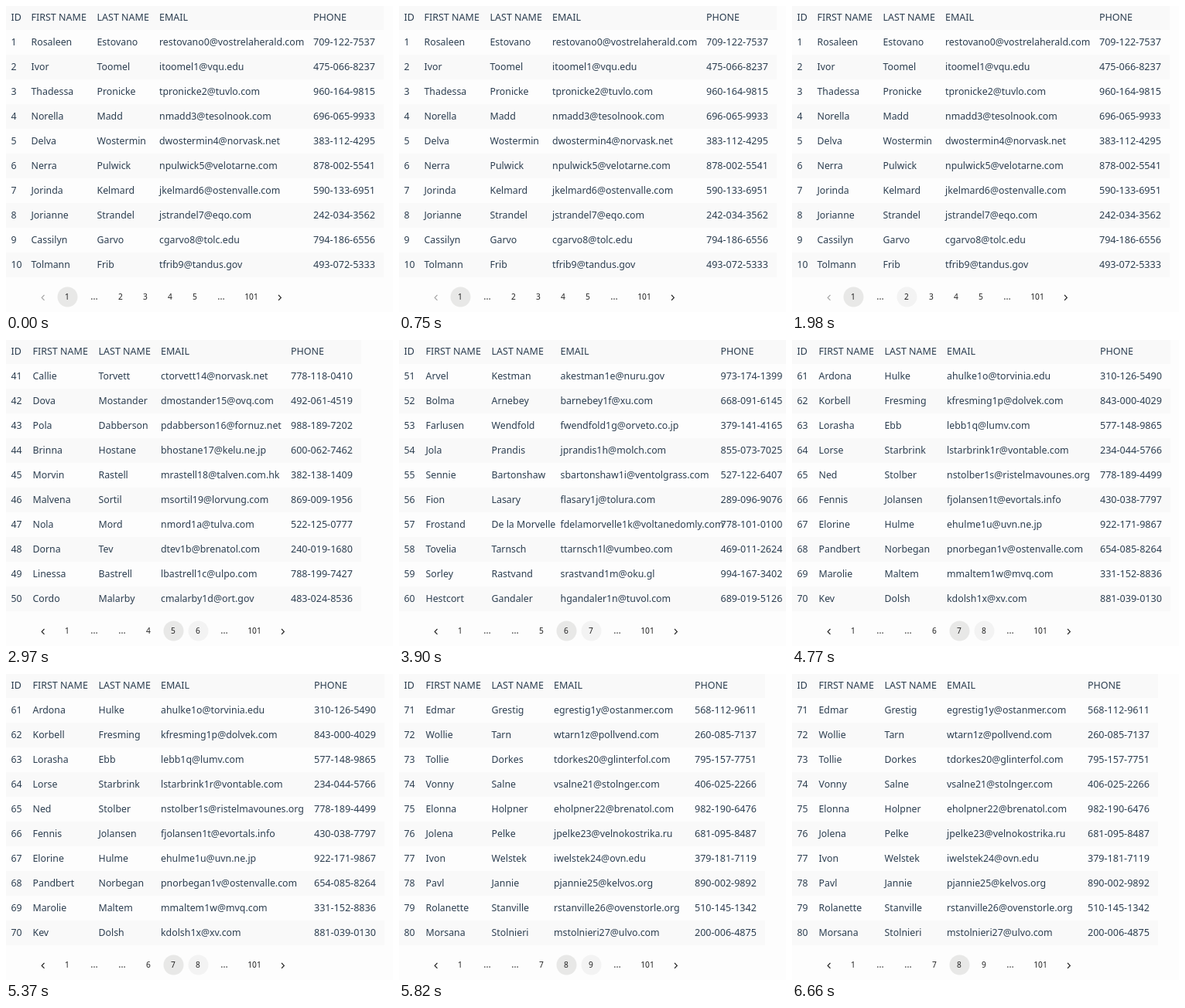
An HTML page for the animation above (6.69 s loop, 500 by 396 pixels).

```html
<!DOCTYPE html>
<html lang="en">
<head>
<meta charset="utf-8">
<title>Paged table</title>
<style>
html, body { margin: 0; width: 100%; height: 100%; overflow: hidden; background: #fdfdfd; }
svg { display: block; width: 500px; height: 396px; }
text { font-family: "Noto Sans", "Open Sans", sans-serif; font-size: 12.35px; fill: #2c3e50; white-space: pre; }
.head { font-size: 12.5px; }
.phone { font-size: 12.55px; }
.nav { font-size: 10.2px; fill: #222; text-anchor: middle; }
.dots { font-size: 12px; fill: #333; text-anchor: middle; }
.arrow { fill: none; stroke: #222; stroke-width: 1.2; }
</style>
</head>
<body>
<svg id="stage" viewBox="0 0 500 396"></svg>
<script>
const LOOP = 6690;
const stage = document.getElementById("stage");

// start: time shown; cols: x of id, first, last, email, phone; people: first, last, domain
const pages = [
  { no: 1, start: 0, cols: [6.5, 32.5, 117.5, 198, 397], people: `Rosaleen,Estovano,vostrelaherald.com
Ivor,Toomel,vqu.edu
Thadessa,Pronicke,tuvlo.com
Norella,Madd,tesolnook.com
Delva,Wostermin,norvask.net
Nerra,Pulwick,velotarne.com
Jorinda,Kelmard,ostenvalle.com
Jorianne,Strandel,eqo.com
Cassilyn,Garvo,tolc.edu
Tolmann,Frib,tandus.gov` },
  { no: 5, start: 2940, cols: [6.5, 34.5, 119.5, 200, 368], people: `Callie,Torvett,norvask.net
Dova,Mostander,ovq.com
Pola,Dabberson,fornuz.net
Brinna,Hostane,kelu.ne.jp
Morvin,Rastell,talven.com.hk
Malvena,Sortil,lorvung.com
Nola,Mord,tulva.com
Dorna,Tev,brenatol.com
Linessa,Bastrell,ulpo.com
Cordo,Malarby,ort.gov` },
  { no: 6, start: 3750, cols: [6.5, 34.5, 119.5, 208.5, 415.5], people: `Arvel,Kestman,nuru.gov
Bolma,Arnebey,xu.com
Farlusen,Wendfold,orveto.co.jp
Jola,Prandis,molch.com
Sennie,Bartonshaw,ventolgrass.com
Fion,Lasary,tolura.com
Frostand,De la Morvelle,voltanedomly.com
Tovelia,Tarnsch,vumbeo.com
Sorley,Rastvand,oku.gl
Hestcort,Gandaler,tuvol.com` },
  { no: 7, start: 4650, cols: [6.5, 34.5, 119.5, 200, 398], people: `Ardona,Hulke,torvinia.edu
Korbell,Fresming,dolvek.com
Lorasha,Ebb,lumv.com
Lorse,Starbrink,vontable.com
Ned,Stolber,ristelmavounes.org
Fennis,Jolansen,evortals.info
Elorine,Hulme,uvn.ne.jp
Pandbert,Norbegan,ostenvalle.com
Marolie,Maltem,mvq.com
Kev,Dolsh,xv.com` },
  { no: 8, start: 5490, cols: [6.5, 34.5, 119.5, 200, 382], people: `Edmar,Grestig,ostanmer.com
Wollie,Tarn,pollvend.com
Tollie,Dorkes,glinterfol.com
Vonny,Salne,stolnger.com
Elonna,Holpner,brenatol.com
Jolena,Pelke,velnokostrika.ru
Ivon,Welstek,ovn.edu
Pavl,Jannie,kelvos.org
Rolanette,Stanville,ovenstorle.org
Morsana,Stolnieri,ulvo.com` }
];

// x, time on, time off, fade out
const hovers = [
  [148, 1980, 2070, 120],
  [180, 2070, 2130, 120],
  [212, 2130, 2220, 120],
  [244, 2220, 2940, 0],
  [248, 2940, 6360, 150]
];

let seed = 7;
function digits(n) {
  let s = "";
  while (n--) {
    seed = (seed * 16807) % 2147483647;
    s += Math.floor(seed / 2147483647 * 10);
  }
  return s;
}

function add(parent, tag, attrs, text) {
  const el = document.createElementNS("http://www.w3.org/2000/svg", tag);
  for (const key in attrs) el.setAttribute(key, attrs[key]);
  if (text !== undefined) el.textContent = text;
  parent.append(el);
  return el;
}

function label(g, x, y, text, cls = "") {
  add(g, "text", { x, y, class: cls }, text);
}

function buildTable(g, page) {
  const { cols, no } = page;
  for (let k = 0; k <= 10; k += 2) {
    add(g, "rect", { x: 0, y: 32 * k - 1, width: cols[4] + 91, height: 32, fill: "#f9f9f9" });
  }
  ["ID", "FIRST NAME", "LAST NAME", "EMAIL", "PHONE"].forEach((s, i) => label(g, cols[i], 19.3, s, "head"));
  page.people.split("\n").forEach((line, i) => {
    const [first, last, domain] = line.split(",");
    const id = (no - 1) * 10 + i + 1;
    const user = (first[0] + last).toLowerCase().replace(/ /g, "") + (id - 1).toString(36);
    const phone = `${2 + (id * 5) % 8}${digits(2)}-${id % 2}${digits(2)}-${digits(4)}`;
    [id, first, last, `${user}@${domain}`, phone].forEach((s, c) =>
      label(g, cols[c], 51.3 + 32 * i, s, c === 4 ? "phone" : ""));
  });
}

function buildNav(g, no) {
  const items = no === 1
    ? [[79, 1], [114, "…"], [148, 2], [180, 3], [212, 4], [244, 5], [278, "…"], [317, 101]]
    : [[79, 1], [114, "…"], [150, "…"], [184, no - 1], [216, no], [248, no + 1], [282, "…"], [321, 101]];
  for (const [x, s] of items) {
    if (s === no) add(g, "circle", { cx: x + 0.5, cy: 376.5, r: 13, fill: "#e8e8e7" });
    label(g, x, s === "…" ? 380 : 380.2, s, s === "…" ? "dots" : "nav");
  }
  const next = no === 1 ? 352 : 356;
  add(g, "path", { d: "M49.5 374l-3.3 3.4 3.3 3.4", class: "arrow", opacity: no === 1 ? 0.4 : 1 });
  add(g, "path", { d: `M${next} 374l3.3 3.4-3.3 3.4`, class: "arrow" });
}

const spots = hovers.map(([x]) => add(stage, "circle", { cx: x + 0.5, cy: 376.5, r: 13, fill: "#f3f3f3" }));
const groups = pages.map(page => {
  const g = add(stage, "g", {});
  buildTable(g, page);
  buildNav(g, page.no);
  return g;
});

function render(t) {
  const shown = pages.filter(p => t >= p.start).length - 1;
  groups.forEach((g, i) => { g.style.display = i === shown ? "" : "none"; });
  hovers.forEach(([, on, off, fade], i) => {
    let a = t >= on && t < off ? 1 : 0;
    if (t >= off && t < off + fade) a = 1 - (t - off) / fade;
    spots[i].style.opacity = a;
  });
}

const begin = performance.now();
function tick() {
  render((performance.now() - begin) % LOOP);
  requestAnimationFrame(tick);
}
tick();
</script>
</body>
</html>
```
